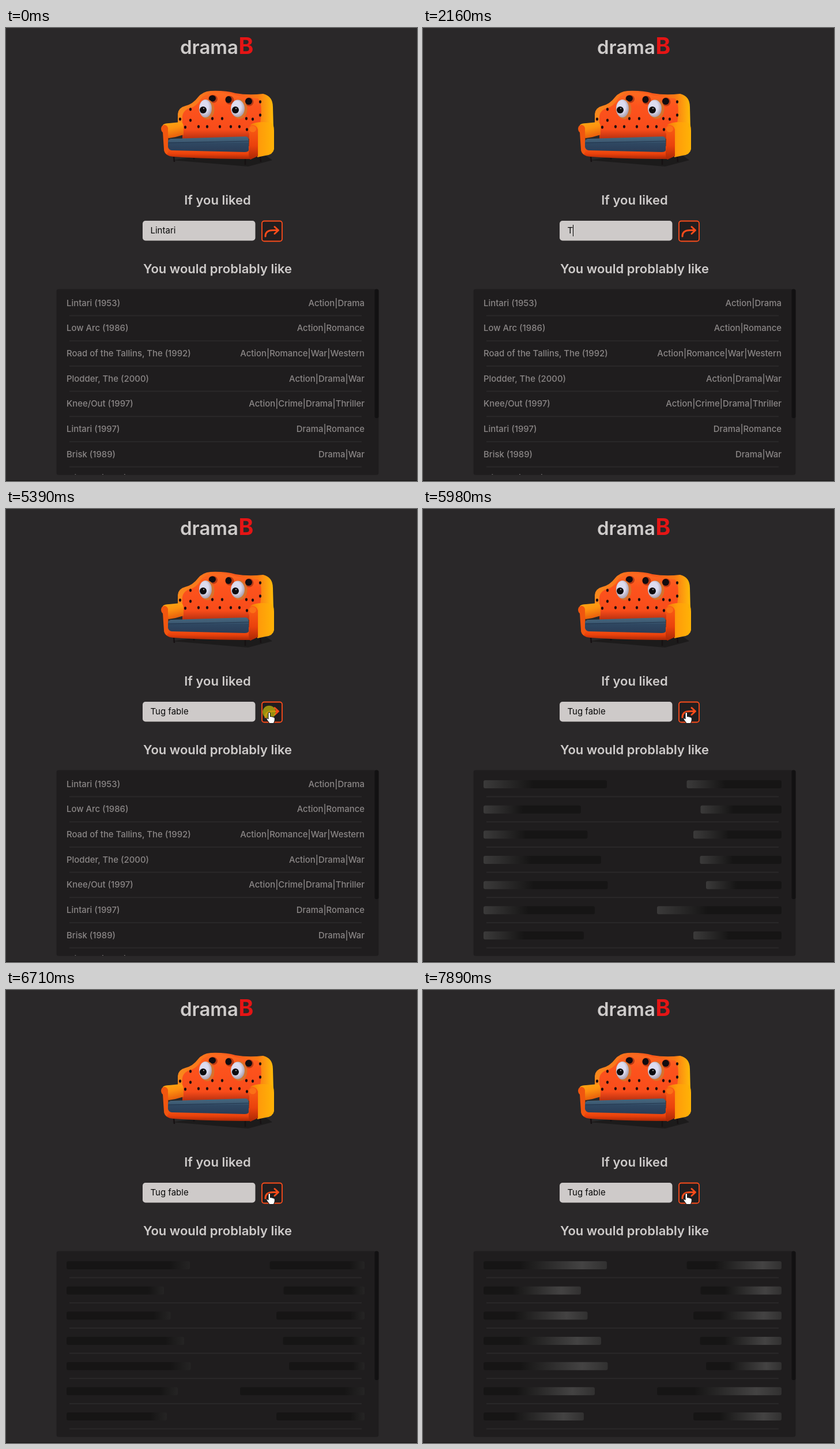
Write an HTML page that moves like this. It is 713x785 px and loops after 8000 ms.

```html
<!DOCTYPE html>
<html lang="en">
<head>
<meta charset="utf-8">
<title>dramaB</title>
<style>
  html, body { margin: 0; width: 100%; height: 100%; overflow: hidden; background: #2a2829; }
  svg { display: block; width: 713px; height: 785px; font-family: Inter, "Open Sans", sans-serif; }
  .heading { font-size: 22px; font-weight: 600; fill: #cecbca; text-anchor: middle; }
  .row { font-size: 14.9px; font-weight: 500; fill: #8a8686; }
  .end { text-anchor: end; }
  #field { font-size: 15px; fill: #080808; white-space: pre; }
  .cursor { fill: #fff; stroke: #111; stroke-width: 1; stroke-linejoin: round; }
</style>
</head>
<body>
<svg viewBox="0 0 713 785">
  <defs>
    <linearGradient id="back">
      <stop offset="0" stop-color="#f98a1c"/><stop offset=".2" stop-color="#fa7a1c"/>
      <stop offset=".6" stop-color="#f7561b"/><stop offset=".84" stop-color="#fb7a14"/>
      <stop offset="1" stop-color="#ffbc08"/>
    </linearGradient>
    <linearGradient id="tufted" x2="0" y2="1">
      <stop offset="0" stop-color="#fb6a20"/><stop offset=".3" stop-color="#fd531d"/>
      <stop offset=".8" stop-color="#f84c1a"/><stop offset="1" stop-color="#b93010"/>
    </linearGradient>
    <linearGradient id="leftArm" x2=".3" y2="1">
      <stop offset="0" stop-color="#ffab12"/><stop offset=".5" stop-color="#fd9010"/>
      <stop offset="1" stop-color="#e8600c"/>
    </linearGradient>
    <linearGradient id="rightArm">
      <stop offset="0" stop-color="#f4790c"/><stop offset=".4" stop-color="#ff9c0a"/>
      <stop offset="1" stop-color="#ffb306"/>
    </linearGradient>
    <linearGradient id="front" x2="0" y2="1">
      <stop offset="0" stop-color="#fb5f14"/><stop offset=".6" stop-color="#ea410c"/>
      <stop offset="1" stop-color="#a92706"/>
    </linearGradient>
    <linearGradient id="cushion" x2="0" y2="1">
      <stop offset="0" stop-color="#46687e"/><stop offset=".32" stop-color="#3d5a73"/>
      <stop offset=".42" stop-color="#2f4862"/><stop offset="1" stop-color="#2a3c56"/>
    </linearGradient>
    <radialGradient id="eye" cx=".42" cy=".4" r=".62">
      <stop offset=".5" stop-color="#dcdcf0"/><stop offset="1" stop-color="#a99da9"/>
    </radialGradient>
    <linearGradient id="shimmer">
      <stop offset="0" stop-color="#161515"/><stop offset=".5" stop-color="#444343"/>
      <stop offset="1" stop-color="#161515"/>
    </linearGradient>
    <clipPath id="panelClip"><rect x="88" y="452" width="558" height="322"/></clipPath>
  </defs>

  <rect width="713" height="785" fill="#2a2829"/>
  <rect y="784" width="713" height="1" fill="#171616"/>
  <text x="403" y="45" font-size="33" font-weight="600" fill="#cecbca" class="end">drama</text>
  <text x="403.5" y="45" font-size="39" font-weight="700" fill="#e51515">B</text>

  <g id="sofa">
    <path d="M288 229L330 223L452 222L462 229L420 240Z" fill="#1c1b1b"/>
    <path d="M291 222L292 232M326 222V228M415 225V237M441 221L442 232" stroke="#161113" stroke-width="2.5"/>
    <path d="M298 168V149Q299 138 311 135Q324 132 333 120Q341 110 355 109Q380 108 398 113Q420 117 446 114Q463 118 463 137L464 175H298Z" fill="url(#back)"/>
    <path d="M306 192V160Q304 144 318 139Q331 136 338 123Q345 113 362 112Q386 112 401 117Q424 121 437 122Q446 130 441 165L424 192Z" fill="url(#tufted)"/>
    <path d="M278 205H425V227Q350 227 290 223Q276 222 274 211Z" fill="url(#front)"/>
    <path d="M272 168Q275 165 283 165L303 163Q308 164 308 172V185Q296 189 282 191L276 186Z" fill="url(#leftArm)"/>
    <path d="M269 174Q270 167 276 168Q282 170 281 177L282 214L279 219Q275 217 274 210L272 181Q269 179 269 174Z" fill="#f0560f"/>
    <path d="M286 192L416 188Q421 189 421 194V212Q420 215 414 215L287 212Q282 211 281 206V197Q281 193 286 192Z" fill="url(#cushion)"/>
    <path d="M282 199L421 196" stroke="#22354c" stroke-width="1.2"/>
    <path d="M424 168Q430 163 446 163L459 164Q465 166 465 178V210Q463 220 450 221L436 224V180Z" fill="url(#rightArm)"/>
    <path d="M420 176Q421 168 429 168Q438 170 437 180L437 222L424 228Q421 226 421 218L422 183Q420 181 420 176Z" fill="url(#front)"/>
    <ellipse cx="428" cy="175" rx="6" ry="5.5" fill="#fb7016"/>
    <g id="seeds" fill="#1b0d0e"></g>
    <g fill="#b93a14">
      <ellipse cx="359" cy="123" rx="8" ry="7"/><ellipse cx="388" cy="125" rx="7.5" ry="7.5"/>
      <ellipse cx="422" cy="128" rx="7.5" ry="7.5"/>
    </g>
    <g fill="#110c10">
      <ellipse cx="358" cy="122" rx="6" ry="5.5"/><ellipse cx="386" cy="124" rx="5.5" ry="6"/>
      <ellipse cx="421" cy="127" rx="6" ry="6"/>
    </g>
    <ellipse cx="349" cy="141" rx="12.5" ry="17" fill="#d9712a"/>
    <ellipse cx="405" cy="140.5" rx="13.5" ry="17" fill="#d9712a"/>
    <ellipse cx="346" cy="139.5" rx="11" ry="15.5" fill="url(#eye)"/>
    <ellipse cx="402" cy="139.5" rx="12" ry="15" fill="url(#eye)"/>
    <circle cx="342" cy="142" r="6" fill="#0d0b0e"/><circle cx="398" cy="142" r="6" fill="#0d0b0e"/>
    <circle cx="343" cy="139.5" r="1" fill="#ccc"/><circle cx="399" cy="139.5" r="1" fill="#ccc"/>
  </g>

  <text x="367" y="306" class="heading">If you liked</text>
  <rect x="237" y="334" width="195.5" height="34.5" rx="5" fill="#cecac9"/>
  <rect id="selection" y="340" height="21" fill="#0078d7"/>
  <text id="field" x="250.5" y="356"><tspan id="plain"></tspan><tspan id="selected" fill="#fff"></tspan></text>
  <path id="squiggle" fill="none" stroke="#e0313d"/>
  <rect id="caret" y="341" width="1" height="20"/>
  <rect x="444" y="334.5" width="35" height="35" rx="4" fill="#211e1f" stroke="#fb4c1b" stroke-width="1.8"/>
  <path d="M450 361C450 353 456 350.5 463 350.5H472M466 344.5L472.5 350.5L466 356.5" fill="none" stroke="#fb4c1b"
    stroke-width="3" stroke-linecap="round" stroke-linejoin="round"/>
  <text x="367" y="425" class="heading">You would problably like</text>

  <rect x="87.5" y="452.5" width="559" height="322" rx="4" fill="#1f1d1e"/>
  <g id="lines" fill="#2a2829"></g>
  <g clip-path="url(#panelClip)">
    <g id="results" class="row"><text x="105" y="784.5">Mirthen (1994)</text></g>
    <g id="bars" fill="url(#shimmer)"></g>
  </g>
  <rect x="639.5" y="452.5" width="7" height="223.5" rx="3" fill="#121112"/>

  <g id="pointer">
    <circle id="press" r="11.3" fill="#b5ac0c" opacity=".8"/>
    <path id="arrow" class="cursor" d="M0 0V16L3.8 12.4L6.4 18.2L8.9 17L6.4 11.4H11.5Z"/>
    <path id="beam" d="M-3 -8H3M0 -8V8M-3 8H3" fill="none" stroke="#222"/>
    <path id="hand" class="cursor" d="M-1.5 2Q-1.5 .3 .3 .3Q2 .3 2 2V8Q3.7 6.6 4.9 8.3Q6.7 7.2 7.6 9Q10 8.4 9.8 11V14Q9 17 7.8 19.5H.5Q-1 16.5 -3.6 13.7Q-5.5 11 -3.5 10.3L-1.5 12Z"/>
  </g>
</svg>
<script>
const LOOP = 8000;
const PITCH = 43.67;
const ROWS = [
  ["Lintari (1953)", "Action|Drama", 214, 164.5],
  ["Low Arc (1986)", "Action|Romance", 169, 140.5],
  ["Road of the Tallins, The (1992)", "Action|Romance|War|Western", 180.5, 153],
  ["Plodder, The (2000)", "Action|Drama|War", 204, 141.5],
  ["Knee/Out (1997)", "Action|Crime|Drama|Thriller", 215.5, 131],
  ["Lintari (1997)", "Drama|Romance", 193, 216],
  ["Brisk (1989)", "Drama|War", 174, 153],
];
const OLD_QUERY = "Lintari", NEW_QUERY = "Tug fable";
const KEY_TIMES = [2160, 2560, 2950, 3150, 3280, 3480, 3610, 3740, 3880];
const SHIMMER_TIMES = [5520, 5850, 5980, 6110, 6250, 6310, 6440, 6580, 6710, 7370, 7500, 7630, 7760, 7890];
const SEEDS = [[302, 158], [320, 141], [320, 160], [311, 172], [334, 171], [349, 171], [358, 157], [375, 157],
  [371, 171], [390, 171], [405, 171], [417, 157], [441, 128], [441, 151], [428, 158], [418, 176]];

const $ = id => document.getElementById(id);
const show = (id, on) => $(id).setAttribute("visibility", on ? "visible" : "hidden");
const clamp = (v, lo = 0, hi = 1) => Math.min(hi, Math.max(lo, v));
const mix = (a, b, p) => a + (b - a) * p;
const smooth = p => p * p * (3 - 2 * p);
const within = (t, from, to) => t >= from && t < to;

function add(parent, tag, attributes, text = "") {
  const node = document.createElementNS("http://www.w3.org/2000/svg", tag);
  for (const key in attributes) node.setAttribute(key, attributes[key]);
  node.textContent = text;
  $(parent).append(node);
}

ROWS.forEach(([title, genres, leftWidth, rightWidth], i) => {
  const offset = i * PITCH;
  add("results", "text", { x: 105, y: 481.5 + offset }, title);
  add("results", "text", { x: 622, y: 481.5 + offset, class: "end" }, genres);
  add("lines", "rect", { x: 110, y: 497.5 + offset, width: 507, height: 2 });
  add("bars", "rect", { x: 105, y: 470 + offset, width: leftWidth, height: 14, rx: 3 });
  add("bars", "rect", { x: 622 - rightWidth, y: 470 + offset, width: rightWidth, height: 14, rx: 3 });
});
SEEDS.forEach(([cx, cy]) => add("seeds", "ellipse", { cx, cy, rx: 2.1, ry: 2.7 }));

let zigzag = "M251 359";
for (let x = 253; x <= 275; x += 2) zigzag += `L${x} ${x % 4 === 1 ? 357 : 360}`;
$("squiggle").setAttribute("d", zigzag);

function pointerAt(t) {
  if (within(t, 260, 1110)) {
    const p = Math.floor(clamp((t - 260) / 65.8, 0, 12)) / 12;
    const approach = smooth(clamp(p / 0.65));
    const drag = smooth(clamp((p - 0.65) / 0.35));
    return {
      x: mix(mix(666, 306, approach), 198.5, drag),
      y: mix(766, 352, approach),
      dragging: p > 0.65, pressed: p > 0.65,
    };
  }
  if (t < 4730) return null;
  const p = smooth(Math.floor(clamp((t - 4730) / 66, 0, 10)) / 10);
  return { x: mix(198.5, 456.5, p), y: 352, pressed: within(t, 5390, 5520) };
}

function drawField(t, pointer) {
  let plain = OLD_QUERY, selected = "";
  if (t >= KEY_TIMES[0]) {
    plain = NEW_QUERY.slice(0, KEY_TIMES.filter(k => k <= t).length);
  } else if (t >= 1110 || pointer?.dragging) {
    const kept = pointer ? Math.round(clamp((pointer.x - 250) / 48) * OLD_QUERY.length) : 0;
    plain = OLD_QUERY.slice(0, kept);
    selected = OLD_QUERY.slice(kept);
  }
  $("plain").textContent = plain;
  $("selected").textContent = selected;
  const plainEnd = 250.5 + (plain ? $("plain").getComputedTextLength() : 0);
  $("selection").setAttribute("x", plainEnd);
  $("selection").setAttribute("width", selected ? $("selected").getComputedTextLength() : 0);
  $("caret").setAttribute("x", Math.floor(plainEnd));
  show("caret", within(t, 2160, 4400) || within(t, 4900, 5390));
  show("squiggle", within(t, 3150, 5390));
}

function drawPointer(pointer) {
  const { x, y, dragging, pressed } = pointer ?? { x: 0, y: 0 };
  const overButton = x > 443 && x < 480 && y > 333 && y < 371;
  const overField = !dragging && x > 237 && x < 433 && y > 333 && y < 369;
  $("pointer").setAttribute("transform", `translate(${x} ${y})`);
  show("press", pointer && pressed);
  show("hand", pointer && overButton);
  show("beam", pointer && overField);
  show("arrow", pointer && !overButton && !overField);
}

function drawResults(t) {
  const loading = t >= 5520;
  show("results", !loading);
  show("bars", loading);
  const sampled = SHIMMER_TIMES.filter(s => s <= t).pop() ?? 5520;
  const phase = ((sampled - 5510) % 1500) / 1500;
  const rise = phase ** 1.75, fall = (1 - phase) ** 1.75;
  const peak = sampled < 5850 ? -0.5 : mix(-0.5, 1.5, rise / (rise + fall));
  $("shimmer").setAttribute("x1", peak - 0.5);
  $("shimmer").setAttribute("x2", peak + 0.5);
}

const start = performance.now();
function draw() {
  const t = (performance.now() - start) % LOOP;
  const pointer = pointerAt(t);
  drawField(t, pointer);
  drawPointer(pointer);
  drawResults(t);
  requestAnimationFrame(draw);
}
draw();
</script>
</body>
</html>
```
